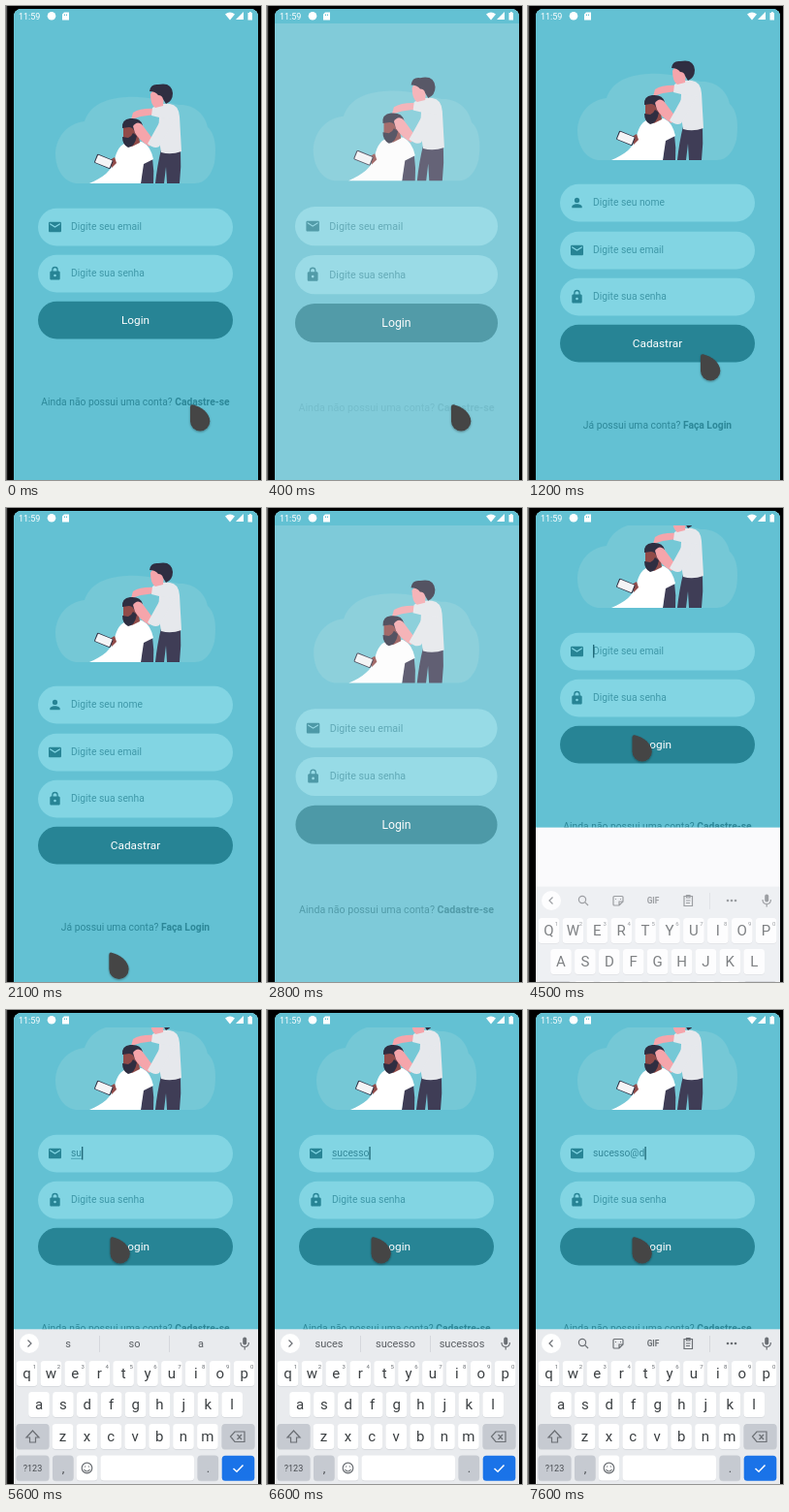
An HTML page for the animation above (8000 ms loop, 263 by 489 pixels).

```html
<!DOCTYPE html>
<html lang="pt-BR">
<head>
<meta charset="utf-8">
<title>Login</title>
<style>
  html, body { margin: 0; height: 100%; overflow: hidden; background: #000; }
  svg { display: block; width: 100vw; height: 100vh; font-family: Roboto, sans-serif; }
  .small { font-size: 10.3px; }
  .hint { fill: #3f98a8; }
  .line { fill: none; stroke: #6b6f74; stroke-width: 1.2; }
</style>
</head>
<body>
<svg id="stage" viewBox="0 0 263 489"></svg>
<script>
const LOOP = 8000;
const TEAL = '#278495', BG = '#63c1d3', INK = '#2f2e41', TROUSERS = '#3f3d56', SKIN = '#f5a5ab';
const SHIRT = '#e6e8ec', BROWN = '#914b49', GREY = '#6b6f74';

const icons = {
  mail: 'M20 4H4c-1.1 0-2 .9-2 2v12c0 1.1.9 2 2 2h16c1.1 0 2-.9 2-2V6c0-1.1-.9-2-2-2zm0 4l-8 5-8-5V6l8 5 8-5z',
  lock: 'M18 8h-1V6a5 5 0 0 0-10 0v2H6c-1.1 0-2 .9-2 2v10c0 1.1.9 2 2 2h12c1.1 0 2-.9 2-2V10c0-1.1-.9-2-2-2zm-6 9a2 2 0 1 1 0-4 2 2 0 0 1 0 4zm3-9H9V6a3 3 0 0 1 6 0z',
  person: 'M12 12a4 4 0 1 0 0-8 4 4 0 0 0 0 8zm0 2c-2.7 0-8 1.3-8 4v2h16v-2c0-2.7-5.3-4-8-4z',
};

const rect = (x, y, w, h, fill, r = 0) => `<rect x="${x}" y="${y}" width="${w}" height="${h}" rx="${r}" fill="${fill}"/>`;
const path = (d, fill) => `<path d="${d}" fill="${fill}"/>`;
const line = d => `<path class="line" d="${d}"/>`;
const label = (x, y, size, text, fill, attrs = '') =>
  `<text x="${x}" y="${y}" font-size="${size}" text-anchor="middle" fill="${fill}" ${attrs}>${text}</text>`;

const pill = (y, fill) => rect(33, y - 19.2, 201, 38.6, fill, 19.3);

const field = (y, icon, hint, id = '') => pill(y, '#82d5e3') +
  `<path d="${icons[icon]}" fill="${TEAL}" transform="translate(42.7 ${y - 7.8}) scale(.65)"/>
   <text class="small hint" x="67" y="${y + 3.4}" ${id && `id="${id}"`}>${hint}</text>`;

const button = (y, text) => pill(y, TEAL) + label(133.5, y + 4.3, 11.8, text, '#fff');

const link = (y, text, action, id) =>
  label(133.5, y, 10.3, `${text} <tspan font-weight="700">${action}</tspan>`, '#2c8798', `id="${id}"`);

const cloud = path('M72 183C59 181 51 168 51 152C52 134 64 121 81 119C86 104 100 95 125 94C145 93 160 98 178 102C192 101 205 110 208 125C217 133 217 150 215 162C212 174 205 183 195 183Z', '#75c8d6');
const barber = `
  ${path('M131 110Q139 105 154 106L153 112L139 114L129 117Z', SKIN)}
  ${path('M160 148H180Q181 166 179 183H166L165 166L163 183H154Q156 164 160 148Z', TROUSERS)}
  ${path('M151 105Q160 100 169 101Q178 102 179 114L181 150Q170 154 160 151L157 133L158 115L150 113Z', SHIRT)}
  ${path('M149 91Q151 86 158 86L163 92L162 103L154 105Q149 102 149 91Z', SKIN)}
  ${path('M148 88Q149 80 157 81Q171 78 172 90Q172 98 165 101L162 96Q161 92 157 92Q154 88 148 88Z', INK)}`;
const customer = `
  ${path('M141 163L151 157Q153 170 152 183H139Z', TROUSERS)}
  ${path('M86 183C100 177 109 170 112 159C114 148 119 142 125 141L140 140Q149 144 152 158L142 163L139 183Z', '#fff')}
  ${path('M121 124L135 121L138 141L130 145L121 139Z', BROWN)}
  ${path('M120 126Q119 117 128 116Q139 115 141 123Q140 130 137 134L133 132Q132 125 127 125Z', INK)}
  ${path('M120 135L126 136Q130 134 131 131L135 134Q133 145 126 146Q120 143 120 135Z', INK)}
  ${path('M107 159L112 156L114 162L109 167Z', BROWN)}
  <g transform="rotate(22 101 160)">${rect(92, 155.5, 18, 9.8, INK, 1.5) + rect(93, 156.3, 16, 8.2, '#f4f4f6', .6)}</g>`;
const nearArm = path('M131 124Q135 118 140 122L152 138L148 145Q138 139 133 131Z', SKIN) +
  path('M161 115L174 117L158 145Q153 148 146 142L150 135Z', SHIRT);
const art = cloud + barber + customer + nearArm;

const background = rect(8, 3, 252, 500, BG);
const loginPage = background + art + field(228, 'mail', 'Digite seu email', 'email') +
  `<path id="underline" stroke="${TEAL}" stroke-width=".6"/><path id="caret" stroke="#1d6675" stroke-width="1.3"/>` +
  field(276, 'lock', 'Digite sua senha') + button(324, 'Login') +
  link(412, 'Ainda não possui uma conta?', 'Cadastre-se', 'signup');
const signupPage = background + `<g transform="translate(0 -24)">${art}</g>` +
  field(203, 'person', 'Digite seu nome') + field(252, 'mail', 'Digite seu email') +
  field(300, 'lock', 'Digite sua senha') + button(348, 'Cadastrar') +
  link(436, 'Já possui uma conta?', 'Faça Login', 'signin');

const status = rect(8, 3, 252, 15, BG) +
  `<text x="13" y="13.5" font-size="9" fill="#fff">11:59</text><circle cx="47" cy="10.3" r="4.3" fill="#fff"/>` +
  path('M60 6.5H65V14.5H58V8.5ZM60 8.5V10H61V8.5ZM62 8.5V10H63V8.5Z', '#fff') +
  path('M226 8.5Q231 4.5 236 8.5L231 14.5Z', '#fff') + path('M245 6V14H237Z', '#fff') +
  path('M249.5 7H251V6H253V7H254V14.5H249.5Z', '#fff');

const KEY_GREY = '#c6cad1';
const key = (x, y, w, fill = '#fff') => rect(x, y + .8, w, 26, '#d3d6da', 3.5) + rect(x, y, w, 26, fill, 3.5);
const keyRow = (letters, x, y, digits) => [...letters].map((c, i) => {
  const cx = x + i * 24.9;
  return key(cx - 10.8, y - 13, 21.6) + label(cx, y + 5, 15, c, '#3c4043', 'class="key"') +
    (digits ? label(cx + 8, y - 5.5, 6, (i + 1) % 10, GREY) : '');
}).join('');

const toolbarIcons = `<g id="tools">
  <circle class="line" cx="56" cy="343" r="3.6"/>${line('M58.7 345.7L62 349')}
  ${line('M89 339.500H97Q98 339.500 98 340.500V345L94 349H89Q88 349 88 348V340.500Q88 339.500 89 339.500M94 349V345H98M90 342.500H91M95 342.500H96')}
  ${label(129, 347, 8.3, 'GIF', GREY, 'font-weight="700"')}
  ${line('M161 339.500H169.500V349.500H161ZM163.500 338.500H167V341H163.500ZM163 344H167.500M163 346.500H167')}
  ${rect(187, 336, .8, 17, '#d0d3d8')}
  ${[206, 210, 214].map(x => `<circle cx="${x}" cy="344" r="1.3" fill="${GREY}"/>`).join('')}</g>`;
const suggestions = `<g id="words">${[64, 132.5, 201].map(x => label(x, 348, 11, '', '#5a5e63', 'class="word"')).join('')}
  ${rect(96, 336, .8, 17, '#d0d3d8') + rect(168, 336, .8, 17, '#d0d3d8')}</g>`;

const keyboard = rect(8, 329.6, 252, 160, '#fafafc') + `<g id="keys">
  ${rect(8, 329.6, 252, 160, '#e9ebee')}
  <circle cx="24" cy="344" r="10" fill="#fff"/><path id="chevron" class="line"/>
  ${toolbarIcons + suggestions}
  ${rect(244.2, 337.5, 4, 8, GREY, 2) + line('M242 343Q242 347.500 246.200 347.500Q250.400 347.500 250.400 343M246.200 347.500V350.500')}
  ${keyRow('qwertyuiop', 21.5, 375, true) + keyRow('asdfghjkl', 34, 407) + keyRow('zxcvbnm', 58.5, 440)}
  ${key(10.5, 427, 34, KEY_GREY) + line('M27.500 434L34 441H30.500V446H24.500V441H21Z')}
  ${key(222.5, 427, 34, KEY_GREY) + line('M236 435H246V445.500H236L231.500 440ZM238.500 438L243 443M243 438L238.500 443')}
  ${key(10.5, 459.5, 34, KEY_GREY) + label(27.5, 476, 9, '?123', '#4a4e53')}
  ${key(48, 459.5, 21.6, KEY_GREY) + label(59, 477, 13, ',', '#4a4e53')}
  ${key(72.7, 459.5, 21.6)}<circle class="line" cx="83.5" cy="472.500" r="5.300"/>
  ${line('M81 471H82.300M84.700 471H86M80.500 474Q83.500 478 86.500 474')}
  ${key(97.5, 459.5, 96.5)}
  ${key(197.5, 459.5, 21.6, KEY_GREY) + label(208.5, 477, 13, '.', '#4a4e53')}
  ${rect(222.7, 459.8, 33.6, 26, '#1a73e8', 3.5)}
  <path d="M234.500 473L238 476.300L244.500 469.500" fill="none" stroke="#fff" stroke-width="1.5"/></g>`;

document.getElementById('stage').innerHTML = `
  <defs>
    <clipPath id="screen"><rect x="8" y="3" width="252" height="500" rx="8"/></clipPath>
    <filter id="shadow" x="-30%" y="-30%" width="160%" height="170%">
      <feDropShadow dx="0" dy="1" stdDeviation="1" flood-opacity=".35"/></filter>
  </defs>
  ${rect(0, 0, 263, 489, '#000') + rect(0, 0, 1.2, 489, '#666')}
  <g clip-path="url(#screen)">
    ${rect(8, 3, 252, 500, '#f2f2f2')}
    <g id="login">${loginPage}</g><g id="register">${signupPage}</g>
    ${status}<g id="keyboard">${keyboard}</g>
  </g>
  <path id="pointer" d="M0 2.5Q0 0 2.500 .3C11 2 20.300 9 20.300 17.500A10.100 10 0 0 1 0 17.500Z" fill="#444" filter="url(#shadow)"/>`;

const $ = id => document.getElementById(id);
const set = (id, attr, value) => $(id).setAttribute(attr, value);
const show = (id, on) => set(id, 'visibility', on ? 'visible' : 'hidden');
const clamp = v => Math.min(1, Math.max(0, v));
const latest = (steps, t) => steps.filter(s => s[0] <= t).pop();

const pointerPath = [
  [0, 190, 411], [1100, 190, 411], [1200, 178, 359], [1300, 178, 359], [1500, 146, 337],
  [1700, 113, 328], [1900, 99, 385], [2200, 110, 495], [3000, 140, 495], [3300, 134, 350],
  [3400, 133, 326], [3600, 133, 269], [3700, 124, 254], [3900, 107.5, 234], [LOOP, 107.5, 234],
];
const EMAIL = 'sucesso@d';
const typedAt = [5300, 5600, 5800, 6000, 6200, 6400, 6600, 7000, 7600];
const wordSteps = [
  [0, '', '', ''], [5600, 's', 'so', 'a'], [5700, 'su', 'sua', 'seu'], [6000, 'suco', 'sucos', 'sucesso'],
  [6300, 'suces', 'sucesso', 'sucessos'], [6700, 'sucesso', 'sucessos', 'sucessão'],
];

function pointerAt(t) {
  const i = pointerPath.findIndex(p => p[0] > t);
  const [t0, x0, y0] = pointerPath[i - 1], [t1, x1, y1] = pointerPath[i];
  const k = (t - t0) / (t1 - t0);
  return [x0 + (x1 - x0) * k, y0 + (y1 - y0) * k];
}

// How far the registration page is open, 0 to 1.
function openness(t) {
  const ease = start => 1 - (1 - clamp((t - start) / 400)) ** 4;
  return t < 2750 ? ease(330) : 1 - ease(2731);
}

const zoom = s => `translate(${133.5 * (1 - s)} ${251 * (1 - s)}) scale(${s})`;

function draw(t) {
  const open = openness(t), focused = t >= 4500;
  set('login', 'transform', focused ? 'translate(0 -80)' : zoom(1 + .075 * open));
  set('login', 'opacity', 1 - .4 * open);
  set('register', 'transform', zoom(.85 + .15 * open));
  set('register', 'opacity', clamp((open - .75) * 8));
  set('signup', 'opacity', t >= 100 && t < 700 ? .3 : 1);

  const typed = EMAIL.slice(0, typedAt.filter(at => at <= t).length);
  const email = $('email');
  email.textContent = typed || 'Digite seu email';
  email.style.fill = typed ? '#348899' : '';
  const end = 67 + (typed ? email.getComputedTextLength() : 0);
  set('underline', 'd', `M67 233.300H${end}`);
  show('underline', typed && t < 7400);
  set('caret', 'd', `M${end + .7} 221V234.500`);
  show('caret', t >= 4300);

  const rise = clamp((t - 4500) / 400);
  show('keyboard', focused);
  set('keys', 'transform', `translate(0 ${61 * (1 - rise) ** 2})`);
  set('keys', 'opacity', clamp(.65 + rise));
  const suggesting = t >= 5600 && t < 7400;
  $('tools').style.display = suggesting ? 'none' : '';
  $('words').style.display = suggesting ? '' : 'none';
  set('chevron', 'd', suggesting ? 'M22.500 340.500L26 344L22.500 347.500' : 'M25.500 340.500L22 344L25.500 347.500');
  const words = latest(wordSteps, t);
  document.querySelectorAll('.word').forEach((el, i) => { el.textContent = words[i + 1]; });
  document.querySelectorAll('.key').forEach(el => {
    el.textContent = t < 5300 ? el.textContent.toUpperCase() : el.textContent.toLowerCase();
  });

  set('pointer', 'transform', `translate(${pointerAt(t)})`);
}

const begin = performance.now();
function tick() {
  draw(Math.floor((performance.now() - begin) % LOOP / 100) * 100);
  requestAnimationFrame(tick);
}
tick();
</script>
</body>
</html>
```
